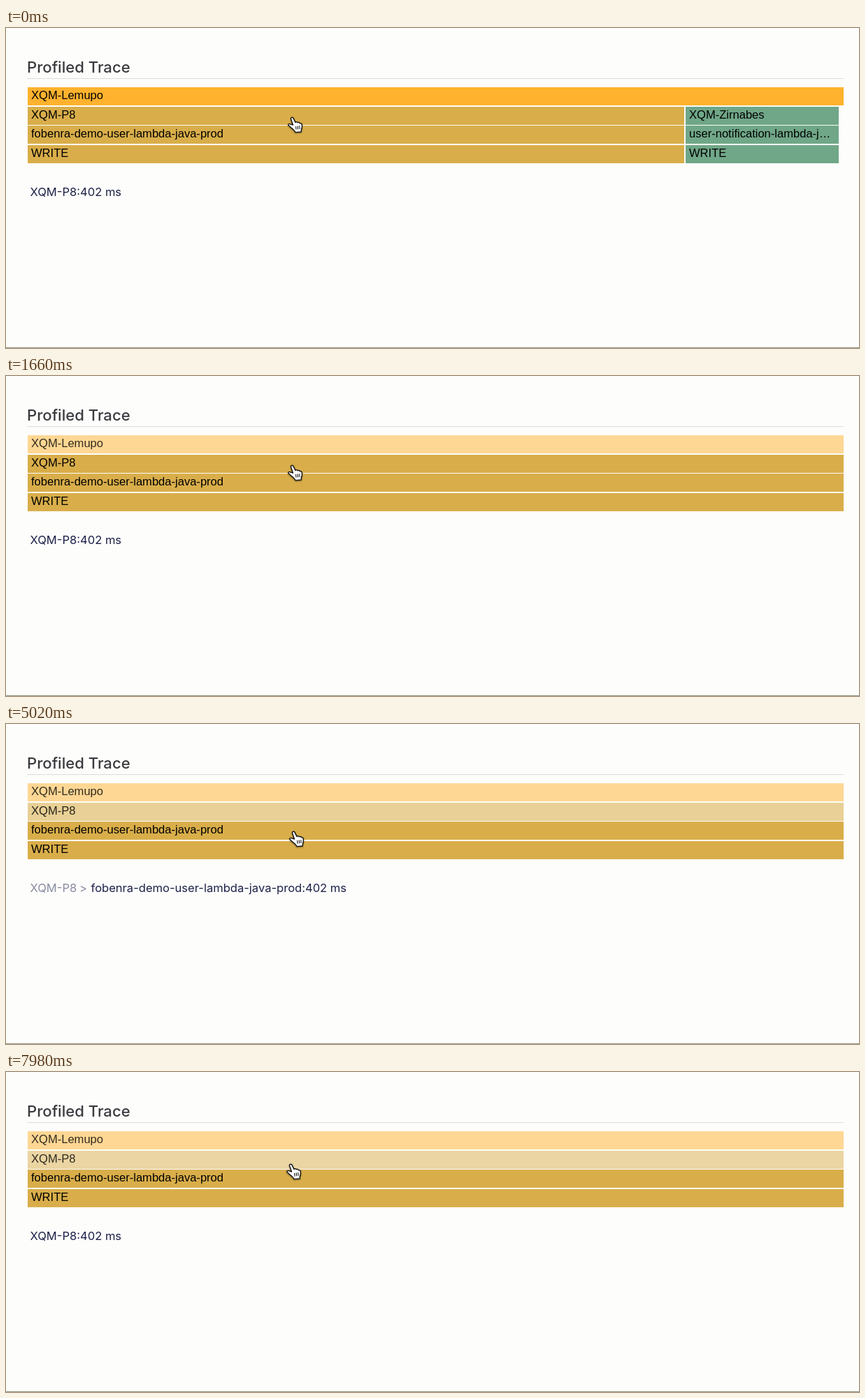
Recreate the animation shown at these times as an HTML page. Size 1220 by 459 pixels, loop 8000 ms.

```html
<!DOCTYPE html>
<html lang="en">
<head>
<meta charset="utf-8">
<title>Profiled Trace</title>
<style>
  html, body { margin: 0; width: 100%; height: 100%; overflow: hidden; background: #fdfdfc; }
  div, svg { position: absolute; box-sizing: border-box; white-space: pre; }
  #title { left: 30px; top: 40px; font: 500 22.1px/32px Inter, sans-serif; color: #3a3a3e; }
  #rule { left: 30px; top: 72px; width: 1168px; height: 1px; background: #dcdcdc; }
  #edge { left: 0; top: 458px; width: 1220px; height: 1px; background: #92917c; }
  #chart { left: 31px; top: 85px; width: 1167px; height: 112px; overflow: hidden; }
  .bar { height: 26px; }
  .fill { inset: 0; }
  .label { inset: 0; padding: 0 5px; overflow: hidden; text-overflow: ellipsis;
           font: 16.56px/24.5px "Liberation Sans", Arial, sans-serif; color: #000; }
  .detail { top: 223px; font: 16.56px/24px Inter, sans-serif; color: #1d2148; }
  .crumb { color: #898ba0; }
  #hand { left: 0; top: 0; overflow: visible; filter: drop-shadow(0 1px 1px #0006); }
</style>
</head>
<body>
<div id="title">Profiled Trace</div>
<div id="rule"></div>
<div id="chart"></div>
<div id="parentInfo" class="detail" style="left:34.5px">XQM-P8:402 ms</div>
<div id="childInfo">
  <div class="detail crumb" style="left:34.5px">XQM-P8</div>
  <div class="detail crumb" style="left:105px">&gt;</div>
  <div class="detail" style="left:121.5px">fobenra-demo-user-lambda-java-prod:402 ms</div>
</div>
<div id="edge"></div>
<svg id="hand" width="22" height="25" stroke="#111" stroke-width="1.4" stroke-linejoin="round" stroke-linecap="round">
  <path fill="#fff" d="M4.6 3.6C3.9 1.6 6.9 .2 8 2.4L11 8.4C11.6 7.2 14 7.4 14.2 8.8C15.4 7.9 17 8.4 17.3 9.8C18.8 9.2 20 10 20.2 11.6C20.6 14 20.4 16.6 19.4 18.6L19.2 22L11 22.6C9.8 20 7.2 18 5 16.2L1 12.6C.2 11 2 9.8 3.6 10.8L7.4 12Z"/>
  <path fill="none" stroke-width="1.1" d="M11.6 14.2l.4 4M14.2 13.8l.3 4M16.8 13.5l.2 4"/>
</svg>
<script>
const LOOP = 8000, ROW = 27.6, ZOOM_MS = 750;
const ZOOM_START = 548, FADE_START = 4515;
const $ = id => document.getElementById(id);

const clamp = v => Math.min(1, Math.max(0, v));
const lerp = (a, b, p) => a + (b - a) * p;
const easeCubic = p => p < .5 ? 4 * p ** 3 : 1 - 4 * (1 - p) ** 3;
const progress = (t, start) => easeCubic(clamp((t - start) / ZOOM_MS));

function addBar(row, color, text) {
  const bar = document.createElement('div');
  const fill = document.createElement('div');
  const label = document.createElement('div');
  bar.className = 'bar';
  fill.className = 'fill';
  label.className = 'label';
  bar.style.top = row * ROW + 'px';
  fill.style.background = color;
  label.textContent = text;
  bar.append(fill, label);
  $('chart').append(bar);
  return { bar, fill, label };
}

function place({ bar }, x, width) {
  bar.style.left = x + 'px';
  bar.style.width = width + 'px';
}

function fade({ fill, label }, p) {
  fill.style.opacity = lerp(1, .5, p);
  label.style.opacity = lerp(1, .8, p);
}

const root = addBar(0, '#ffb22e', 'XQM-Lemupo');
const gold = ['XQM-P8', 'fobenra-demo-user-lambda-java-prod', 'WRITE']
  .map((text, i) => addBar(i + 1, '#d9ae4a', text));
const green = ['XQM-Zirnabes', 'user-notification-lambda-java-prod', 'WRITE']
  .map((text, i) => addBar(i + 1, '#70a788', text));
place(root, 0, 1166.5);

// Pointer path: time, x, y
const pointer = [
  [0, 403, 127], [2960, 403, 127], [3560, 405, 150], [3800, 405, 150],
  [4450, 405, 153], [5060, 405, 153], [5600, 405, 155],
  [6480, 405, 155], [7300, 401, 131], [LOOP, 401, 131]
];

function pointerAt(t) {
  const i = pointer.findIndex(k => k[0] > t);
  const [t0, x0, y0] = pointer[i - 1], [t1, x1, y1] = pointer[i];
  const p = (t - t0) / (t1 - t0), s = p * p * (3 - 2 * p);
  return [lerp(x0, x1, s), lerp(y0, y1, s)];
}

function draw() {
  const t = performance.now() % LOOP;
  const zoom = progress(t, ZOOM_START);
  gold.forEach(b => place(b, 0, lerp(939, 1166.5, zoom)));
  green.forEach(b => place(b, lerp(941, 1168, zoom), lerp(218.5, 272, zoom)));
  fade(root, zoom);
  fade(gold[0], progress(t, FADE_START));

  const [x, y] = pointerAt(t);
  $('hand').style.transform = `translate(${x}px, ${y}px)`;
  const onChild = y > 139;
  $('parentInfo').hidden = onChild;
  $('childInfo').hidden = !onChild;
  requestAnimationFrame(draw);
}
draw();
</script>
</body>
</html>
```
